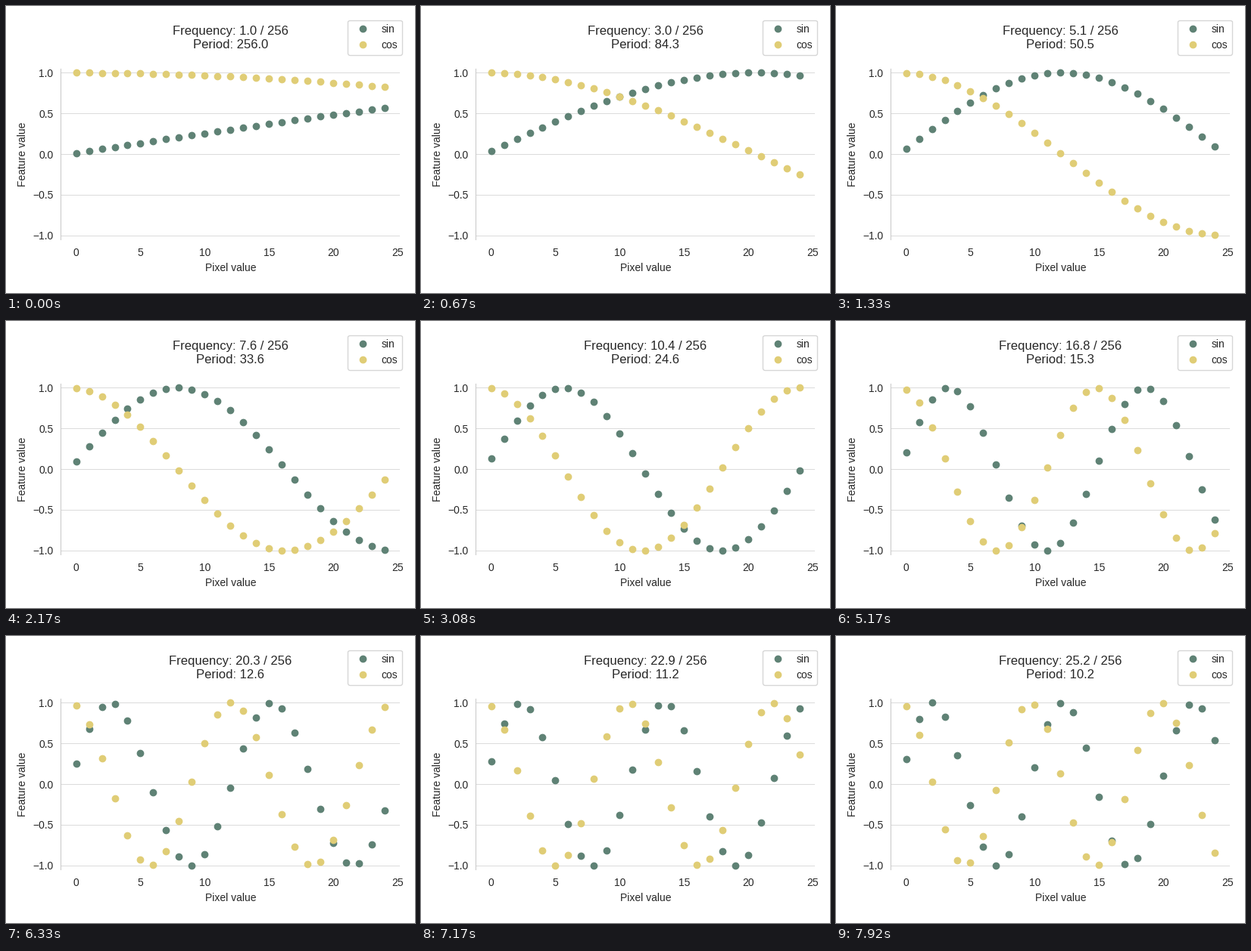
These frames come from a looping animation (540 by 380 pixels, 8 s). A matplotlib script:

```python
import numpy as np
import matplotlib.pyplot as plt
from matplotlib.animation import FuncAnimation

W, H, DPI = 540, 380, 100
LOOP_MS, STEPS, SUB = 8000, 96, 3
FRAMES = STEPS * SUB
SIZE = 256
FREQS = np.linspace(1, 128, 500)
GREEN, YELLOW = "#5f8275", "#e0cd76"
INK, LINE = "0.15", "0.8"

plt.rcParams.update({
    "font.family": "Liberation Sans",
    "font.size": 10,
    "text.color": INK,
    "axes.labelcolor": INK,
    "xtick.color": INK,
    "ytick.color": INK,
    "axes.edgecolor": LINE,
    "grid.color": LINE,
})

fig = plt.figure(figsize=(W / DPI, H / DPI), dpi=DPI, facecolor="white")

# Axes box in pixels, measured from the top left corner
left, right, top, bottom = 72.2, 520.4, 82.95, 309.25
ax = fig.add_axes([left / W, 1 - bottom / H, (right - left) / W, (bottom - top) / H])
ax.set_xlim(-1.2, 25.2)
ax.set_ylim(-1.05, 1.05)
ax.set_xticks(range(0, 26, 5))
ax.set_yticks(np.arange(-1, 1.1, 0.5))
ax.tick_params(left=False, bottom=False)
ax.tick_params(axis="x", pad=3.9)
ax.spines[["top", "right", "bottom"]].set_visible(False)
ax.set_axisbelow(True)
ax.grid(axis="y", linewidth=0.5)
ax.set_xlabel("Pixel value", labelpad=4.7)
ax.set_ylabel("Feature value", labelpad=4.7)

pixels = np.arange(25)
sin_dots, = ax.plot(pixels, 0 * pixels, "o", color=GREEN, label="sin")
cos_dots, = ax.plot(pixels, 0 * pixels, "o", color=YELLOW, label="cos")
title = ax.set_title("", fontsize=12, pad=19.6)

legend = ax.legend(loc="upper right", borderaxespad=0,
                   bbox_to_anchor=(522.7 / W, 1 - 18.5 / H),
                   bbox_transform=fig.transFigure)


def update(frame):
    # Each step starts one sub-frame early
    step = min((frame + 1) // SUB, STEPS - 1)
    freq = FREQS[step]
    phase = 2 * np.pi * freq * (pixels + 0.5) / SIZE
    sin_dots.set_ydata(np.sin(phase))
    cos_dots.set_ydata(np.cos(phase))
    title.set_text(f"Frequency: {freq:.1f} / {SIZE}\nPeriod: {SIZE / freq:.1f}")
    return sin_dots, cos_dots, title


anim = FuncAnimation(fig, update, frames=FRAMES, interval=LOOP_MS / FRAMES,
                     repeat=True, repeat_delay=0)
plt.show()
```
